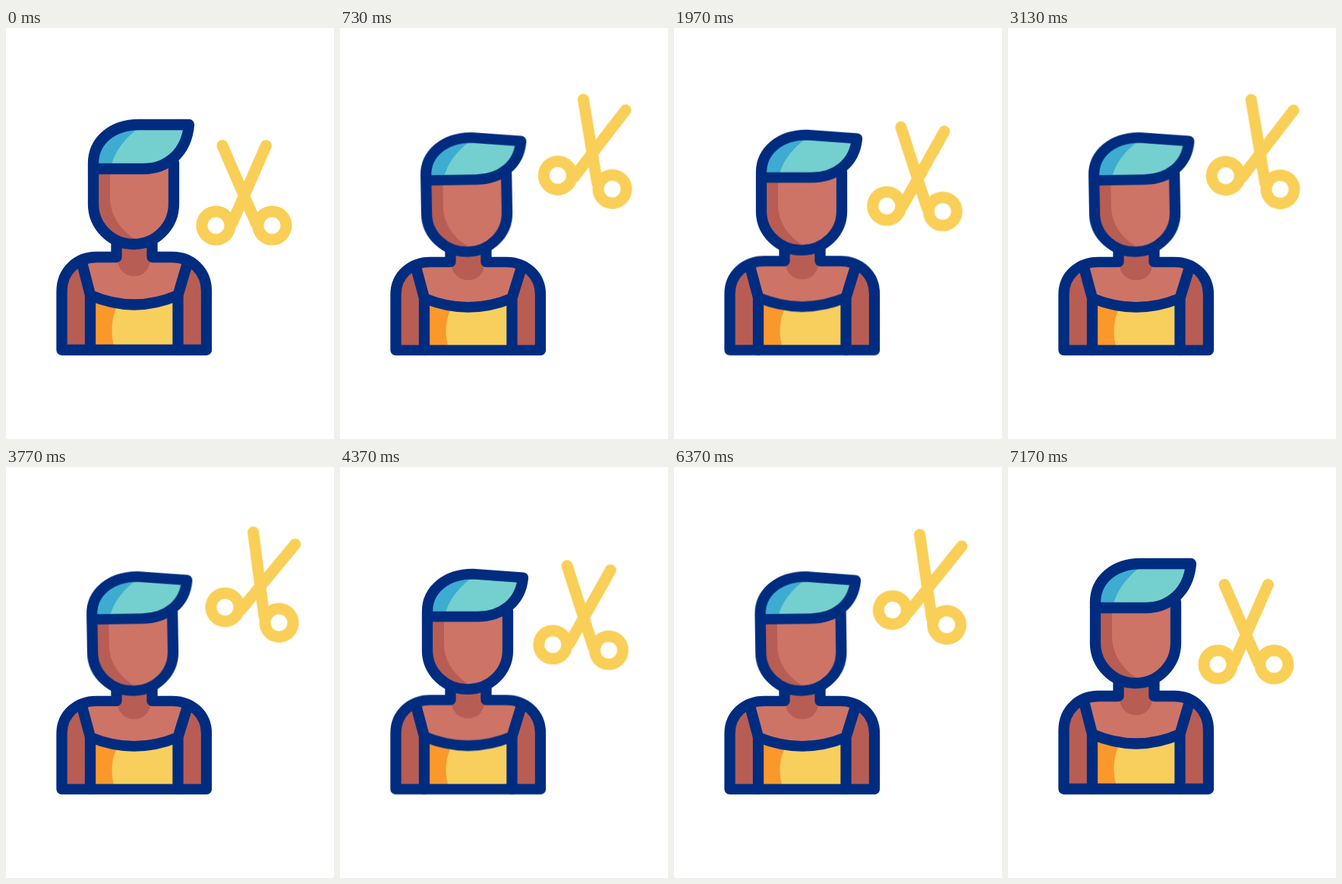
Animation, 432 px wide and 540 px high, one loop 7.21 s. Source, as an HTML page:

```html
<!DOCTYPE html>
<html lang="en">
<head>
<meta charset="utf-8">
<title>Haircut</title>
<style>
  html, body { margin: 0; width: 100%; height: 100%; overflow: hidden; background: #fff; }
  svg { display: block; width: 432px; height: 540px; }

  .line { fill: none; stroke: #002c80; stroke-width: 14.3; stroke-linejoin: round; stroke-linecap: round; }
  .skin { fill: #cd7467; }
  .shade { fill: #b75d54; }
  .dress { fill: #f8cf5c; }
  .fold { fill: #fa982b; }
  .hair { fill: #3dacd0; }
  .shine { fill: #74d0cf; }
  .steel { fill: none; stroke: #f9cf57; stroke-width: 15; stroke-linecap: round; }

  .body, .head, .lean, .scissors, .tuft, .shine {
    animation: 2403.333ms cubic-bezier(.5, 0, .5, 1) infinite;
  }
  .body { transform-origin: 169px 430px; animation-name: body; }
  .head { transform-origin: 168px 284px; animation-name: head; }
  .lean { transform-origin: 168px 284px; animation-name: lean; }
  .scissors { transform-origin: 313.5px 206px; animation-name: lift; }
  .tuft { animation-name: tuft; }
  .shine { animation-name: shine; }

  @keyframes body {
    0%, 5.6%, 98.6%, 100% { transform: scale(1, 1); }
    30.5%, 73.6% { transform: scale(1, .95); }
  }
  @keyframes head {
    0%, 5.6%, 98.6%, 100% { transform: translate(0, 0) scale(1, 1); }
    30.5%, 73.6% { transform: translate(0, 10px) scale(1, .955); }
  }
  @keyframes lean {
    0%, 11%, 82%, 100% { transform: rotate(0deg); }
    30.5%, 55.5% { transform: rotate(-1deg); }
  }
  @keyframes lift {
    0%, 10.2%, 99.6%, 100% { transform: translate(0, 0) rotate(0deg); }
    37.8%, 57.8% { transform: translate(25.3px, -63px) rotate(16deg); }
  }
  /* the tip of the hair droops while the head is down */
  @keyframes tuft {
    0%, 5.6%, 98.6%, 100% { d: path("M115 185 L115 178 C115 148 140 127 175 127 L241 127 C238 163 213 185 181 185 Z"); }
    30.5%, 73.6% { d: path("M115 185 L115 178 C115 148 140 127 175 127 L241 133 C238 166 213 185 181 185 Z"); }
  }
  @keyframes shine {
    0%, 5.6%, 98.6%, 100% { d: path("M138 185 C142 162 157 144 180 127 L241 127 C238 163 213 185 181 185 Z"); }
    30.5%, 73.6% { d: path("M138 185 C142 162 157 144 180 127 L241 133 C238 166 213 185 181 185 Z"); }
  }
</style>
</head>
<body>
<svg viewBox="0 0 432 540">
  <g class="body">
    <path class="shade" d="M73.5 423V346C73.5 319 94 301 119 301H219C244 301 264 319 264 346V423Z"/>
    <path class="skin" d="M101 301H238V312L227 351Q169 376 111 351L101 312Z"/>
    <path class="shade" d="M145.5 270H192.5V300L190 307C188 319 180 326 169 326S149 319 147 307Z"/>
    <path class="dress" d="M111 351Q169 376 227 351V423H111Z"/>
    <path class="fold" d="M111 351Q130 359 148 362C138 380 137 403 144 423H111Z"/>
    <path class="line" d="M145.5 278V301H119C94 301 73.5 319 73.5 346V423H264V346C264 319 244 301 219 301H192.5V278"/>
    <path class="line" d="M101 312L111 351V423M238 312L226.5 351V423M111 351Q169 376 226.5 351"/>
  </g>

  <g class="head">
    <g class="lean">
      <path class="skin" d="M115 180V231A53 53 0 0 0 221 231V178Z"/>
      <path class="shade" d="M115 180V231A53 53 0 0 0 168 284L172 279C151 266 137 246 137 222V180Z"/>
      <path class="line" d="M115 185V231A53 53 0 0 0 221 231V177"/>
      <path class="hair tuft" d="M115 185 L115 178 C115 148 140 127 175 127 L241 127 C238 163 213 185 181 185 Z"/>
      <path class="shine" d="M138 185 C142 162 157 144 180 127 L241 127 C238 163 213 185 181 185 Z"/>
      <path class="line tuft" d="M115 185 L115 178 C115 148 140 127 175 127 L241 127 C238 163 213 185 181 185 Z"/>
    </g>
  </g>

  <g class="scissors steel">
    <path d="M285 154.5L329.5 257M342.5 154.5L297.5 257"/>
    <circle cx="276.5" cy="259.5" r="18.5"/>
    <circle cx="350.5" cy="259.5" r="18.5"/>
  </g>
</svg>
</body>
</html>
```
